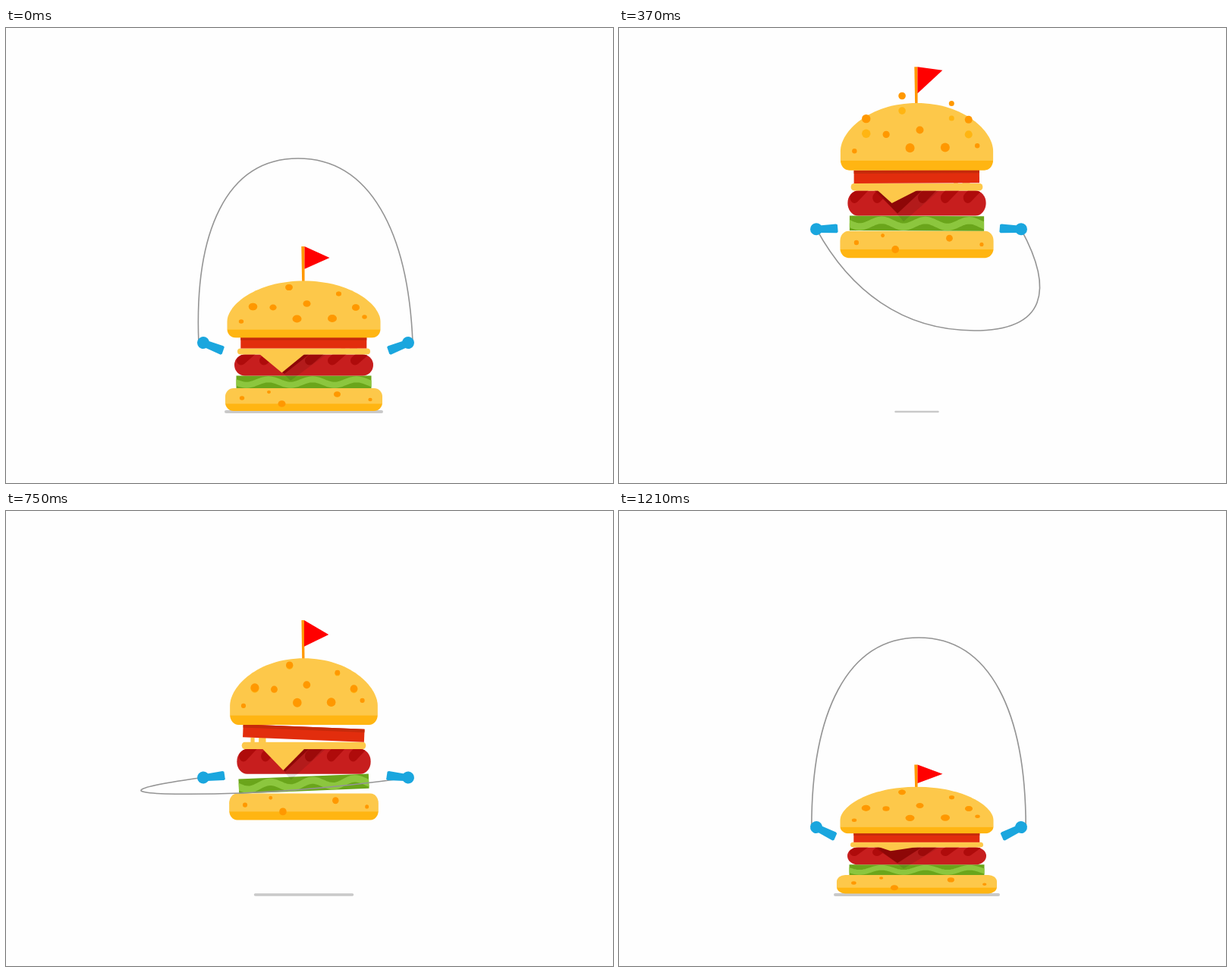
Write an HTML page with a canvas that moves like this. It is 800 by 600 pixels and loops after 1.25 s.

```html
<!DOCTYPE html>
<html lang="en">
<head>
<meta charset="utf-8">
<title>Skipping burger</title>
<style>
html, body { margin: 0; width: 100%; height: 100%; overflow: hidden; background: #fefefe; }
canvas { display: block; width: 800px; height: 600px; }
</style>
</head>
<body>
<canvas id="stage" width="800" height="600"></canvas>
<script>
const ctx = document.getElementById('stage').getContext('2d');
const LOOP = 1250, STEPS = 30, JUMP = 15, PEAK = 6, APEX = 10, LAND = 14;
const CX = 392.5, HANDS_X = 395;
const COLORS = {
  bun: '#fdc84a', crust: '#ffb512', seed: '#ff9800', tomato: '#e22d0d', tomatoTop: '#c62a0b',
  patty: '#c71e1e', grill: '#af0b0b', pattyShade: '#9e0808', lettuce: '#6aa51b', leaf: '#8cc63e',
  flag: '#ff0000', handle: '#1aa6de', rope: '#949494', ground: '#c9c9c9'
};

// x, y, radius
const LOOSE_SEEDS = [[325.5, 367.5, 5.7], [373, 342, 4.8], [438.5, 350.5, 3.5], [461, 368.5, 5]];
const FIXED_SEEDS = [[352, 368.5, 4.6], [396.5, 363.5, 5], [383.5, 383.5, 6], [430, 383, 6], [472.5, 381, 3.2], [310, 387, 3.2]];
const BASE_SEEDS = [[311, 488, 3.2], [346.5, 480, 2.5], [363.5, 495.5, 5], [436.5, 483, 4.5], [480, 490, 2.6]];

// Step, height and angle of the hands over both jumps.
const HANDS = [[0, 415, 22], [6, 258, -12], [11, 270, 5], [15, 421, -8], [21, 282, -3], [25, 273, 15], [29, 417, 27], [30, 415, 22]];
// Step in one jump and the rope's middle, measured from the point between the hands.
const SWING = [[0, -10, -243], [3, -155, 20], [6, -77, 196], [10, 123, 113], [11, 150, 14], [14, 0, -250], [15, -10, -243]];

const mix = (a, b, t) => a + (b - a) * t;
const clamp = t => Math.max(0, Math.min(1, t));

function sample(keys, step) {
  const n = keys.findIndex(key => key[0] > step);
  const a = keys[n - 1], b = keys[n];
  return a.slice(1).map((v, i) => mix(v, b[i + 1], (step - a[0]) / (b[0] - a[0])));
}

// The body shoots up and stretches, catches up with itself at the apex, then drops and squashes.
function poseAt(phase) {
  const left = 1 - clamp(phase / APEX);
  const fall = clamp((phase - APEX) / (LAND - APEX));
  const up = clamp(phase / PEAK);
  const curl = clamp((phase - PEAK) / (APEX - PEAK));
  const tilt = phase < PEAK ? up * (1.3 - .3 * up) : (1 - curl) ** 2;
  return {
    tilt, curl, fall,
    bottom: 300 + 205 * left ** 1.81 + 204.5 * fall ** 1.25,
    stretch: phase < PEAK ? 1 + .295 * tilt : 1.175 + .12 * tilt - .355 * fall ** 1.9,
    seedLift: 26 * (1 - left) ** 2.7 * (1 - fall ** 1.3),
    flagSink: 6 * up + 2 * fall,
    flagTip: 15 * (1 + .13 * tilt) * (1 - curl * (1 - fall ** 3)),
    shadow: 57 + 152 * left ** 2 + 162 * fall
  };
}

function fillRect(color, x, y, w, h) {
  ctx.fillStyle = color;
  ctx.fillRect(x, y, w, h);
}

function fillRound(color, x, y, w, h, r) {
  ctx.fillStyle = color;
  ctx.beginPath();
  ctx.roundRect(x, y, w, h, r);
  ctx.fill();
}

function fillPoly(color, ...points) {
  ctx.fillStyle = color;
  ctx.beginPath();
  points.forEach(([x, y]) => ctx.lineTo(x, y));
  ctx.closePath();
  ctx.fill();
}

function drawSeed(color, x, y, r) {
  ctx.fillStyle = color;
  ctx.beginPath();
  ctx.ellipse(x, y, r, r * .85, 0, 0, Math.PI * 2);
  ctx.fill();
}

function clipped(outline, draw) {
  ctx.save();
  ctx.beginPath();
  outline();
  ctx.clip();
  draw();
  ctx.restore();
}

function drawBase() {
  clipped(() => ctx.roundRect(289, 475, 207, 30, 11), () => {
    fillRect(COLORS.bun, 285, 474, 215, 22);
    fillRect(COLORS.crust, 285, 495.5, 215, 10.5);
  });
  BASE_SEEDS.forEach(seed => drawSeed(COLORS.seed, ...seed));
}

function drawLettuce() {
  clipped(() => ctx.rect(303.5, 458.5, 178, 16.5), () => {
    fillRect(COLORS.lettuce, 303, 458, 179, 18);
    ctx.beginPath();
    for (let x = 300; x <= 486; x += 2) ctx.lineTo(x, 467 + 3.7 * Math.cos((x - 317) * Math.PI / 29));
    ctx.strokeStyle = COLORS.leaf;
    ctx.lineWidth = 8;
    ctx.stroke();
  });
}

function drawPatty() {
  clipped(() => ctx.roundRect(301, 430.5, 183, 28, 14), () => {
    fillRect(COLORS.patty, 300, 430, 185, 30);
    ctx.strokeStyle = COLORS.grill;
    ctx.lineWidth = 12;
    ctx.lineCap = 'round';
    ctx.beginPath();
    for (let x = 310; x < 480; x += 30) {
      ctx.moveTo(x, 438.5);
      ctx.lineTo(x + 16, 424.5);
    }
    ctx.stroke();
    fillPoly(COLORS.pattyShade, [336, 430], [400, 430], [367, 456]);
  });
  fillPoly('rgba(0,0,0,.1)', [340, 430.5], [422, 430.5], [375, 465]);
}

function drawCheese({ tilt, curl, fall }, side) {
  const x = side > 0 ? 441.5 : 317.5, drip = 9 * tilt;
  fillRect(COLORS.bun, x, 422.5 - drip, 5.6, drip + 2);
  fillRect(COLORS.bun, x + 11.5, 422.5 - drip, 10, drip + 2);
  fillRound(COLORS.bun, 305, 422.5, 175, 8, 4);
  const drop = 24 * (1 - .55 * curl - .2 * Math.sqrt(fall));
  fillPoly(COLORS.bun, [334 + 8 * curl, 430], [393.5, 430], [363.5 - 5.5 * curl, 430.5 + drop]);
}

function drawTomato() {
  fillRect(COLORS.tomato, 309.3, 408, 166, 14.5);
  fillRect(COLORS.tomatoTop, 309.3, 408, 166, 3.6);
}

function drawFlag({ flagSink, flagTip, stretch, tilt }) {
  const y = 288 + flagSink / stretch, x = 393.5 - tilt;
  fillPoly(COLORS.seed, [389.3, y], [x, y], [393.6, 337], [390.2, 337]);
  fillPoly(COLORS.flag, [x, y], [426.5, y + flagTip], [x, y + 29.7]);
}

function bunOutline() {
  ctx.moveTo(291.5, 397);
  ctx.lineTo(291.5, 387);
  ctx.bezierCurveTo(291.5, 365, 330, 333.5, CX, 333.5);
  ctx.bezierCurveTo(455, 333.5, 493.5, 365, 493.5, 387);
  ctx.lineTo(493.5, 397);
  ctx.bezierCurveTo(493.5, 404, 488, 408.5, 482, 408.5);
  ctx.lineTo(303, 408.5);
  ctx.bezierCurveTo(297, 408.5, 291.5, 404, 291.5, 397);
}

function drawBun(pose) {
  drawFlag(pose);
  clipped(bunOutline, () => {
    fillRect(COLORS.bun, 288, 333, 210, 65);
    fillRect(COLORS.crust, 288, 397.7, 210, 11);
  });
  FIXED_SEEDS.forEach(seed => drawSeed(COLORS.seed, ...seed));
  for (const [x, y, r] of LOOSE_SEEDS) {
    drawSeed(COLORS.crust, x, y, r);
    drawSeed(COLORS.seed, x, y - pose.seedLift / pose.stretch, r);
  }
}

function drawBurger(pose, side) {
  const { tilt, stretch } = pose, wide = 1 - .063 * tilt;
  let floor = pose.bottom;
  // Stacks a part, drawn in resting coordinates, on the ones below; leaning parts need more room.
  function stack(restTop, restBottom, width, lean, draw) {
    const height = (restBottom - restTop) * stretch + 2.75 * Math.abs(lean);
    ctx.save();
    ctx.translate(CX, floor - height / 2);
    ctx.rotate(lean * Math.PI / 180);
    ctx.scale(width, stretch);
    ctx.translate(-CX, -(restTop + restBottom) / 2);
    draw(pose, side);
    ctx.restore();
    floor -= height;
  }
  stack(475, 505, 1 - .11 * (stretch - 1) - .054 * tilt, 0, drawBase);
  stack(458.5, 475, wide, 4 * tilt * side, drawLettuce);
  stack(430.5, 458.5, wide, 0, drawPatty);
  stack(422.5, 430.5, 1 - .114 * tilt, 0, drawCheese);
  stack(408, 422.5, wide, -4 * tilt * side, drawTomato);
  stack(333.5, 408, wide, 0, drawBun);
}

function drawGround({ shadow }) {
  const thick = Math.min(4, 1.6 + shadow / 70);
  fillRound(COLORS.ground, CX - shadow / 2, 506 - thick / 2, shadow, thick, thick / 2);
}

// Two curves meet at the rope's middle; both ends leave the hands towards it.
function drawRope(step, handY) {
  let [dx, dy] = sample(SWING, step % JUMP);
  if (step >= JUMP && dy > 0) dy *= 1.09; // the second turn hangs lower
  const reach = 137 - dy / 60, half = 95, pull = .6;
  const midX = HANDS_X + dx, midY = handY + dy;
  const leftX = HANDS_X - reach, rightX = HANDS_X + reach, pullY = handY + dy * pull;
  ctx.beginPath();
  ctx.moveTo(leftX, handY);
  ctx.bezierCurveTo(leftX + dx * pull, pullY, midX - half, midY, midX, midY);
  ctx.bezierCurveTo(midX + half, midY, rightX + dx * pull, pullY, rightX, handY);
  ctx.strokeStyle = COLORS.rope;
  ctx.lineWidth = 1.6;
  ctx.stroke();
}

function drawHandle(y, degrees, side) {
  ctx.save();
  ctx.translate(HANDS_X - 135 * side, y);
  ctx.scale(side, 1);
  ctx.rotate(degrees * Math.PI / 180);
  fillRound(COLORS.handle, -8, -8, 16, 16, 8);
  fillPoly(COLORS.handle, [4, -4.5], [26, -6], [28, -5], [28.5, 4.5], [27, 6], [4, 5]);
  ctx.restore();
}

function drawScene(step) {
  const phase = step % JUMP, side = step < JUMP ? 1 : -1;
  const pose = poseAt(phase);
  const [handY, degrees] = sample(HANDS, step);
  const ropeInFront = phase > 0 && phase < PEAK;
  fillRect('#fefefe', 0, 0, 800, 600);
  drawGround(pose);
  if (!ropeInFront) drawRope(step, handY);
  drawBurger(pose, side);
  if (ropeInFront) drawRope(step, handY);
  drawHandle(handY, degrees, 1);
  drawHandle(handY, degrees, -1);
}

function tick() {
  // The small lead absorbs step times rounded to 10 ms.
  drawScene(Math.floor((performance.now() + 6) % LOOP / LOOP * STEPS));
  requestAnimationFrame(tick);
}
tick();
</script>
</body>
</html>
```
